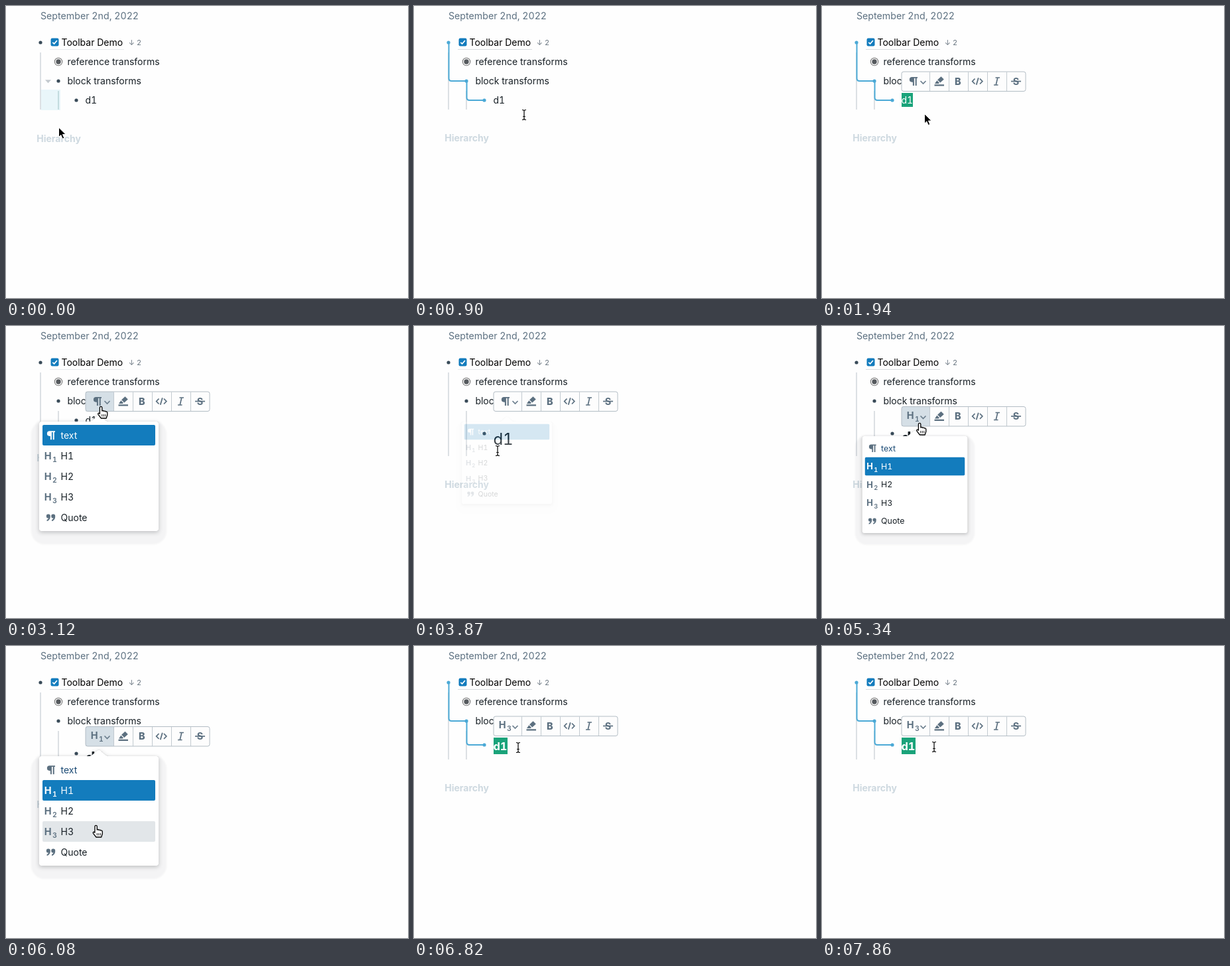
These frames come from a looping animation (606x440 px, 8000 ms). An HTML page:

```html
<!DOCTYPE html>
<html lang="en">
<head>
<meta charset="utf-8">
<title>Toolbar demo</title>
<style>
  html, body { margin: 0; width: 100%; height: 100%; overflow: hidden; background: #fefefe; }
  svg { display: block; width: 100vw; height: 100vh; }
  text { font: 14px Inter, sans-serif; font-variant-numeric: tabular-nums; white-space: pre; }
  .panel { filter: drop-shadow(0 0 .7px rgba(16,22,26,.35)) drop-shadow(0 2px 3px rgba(16,22,26,.24)); }
  .halo { filter: blur(1px); }
</style>
</head>
<body>
<svg id="stage" viewBox="0 0 606 440"></svg>
<script>
const LOOP = 8000, TICK = 148.3, LAST = 53;
const INK = '#182026', SLATE = '#5c7080', BULLET = '#394b59', LINE = '#d0d6db',
      TRAIL = '#4ba9d6', BLUE = '#137cbd', GREEN = '#1aa37a';

const between = (k, a, b) => k >= a && k <= b;
const group = (x, y, body, extra = '') => `<g transform="translate(${x} ${y})" ${extra}>${body}</g>`;
const text = (x, y, s, fill = INK, size = 14, weight = 400) =>
  `<text x="${x}" y="${y}" fill="${fill}" style="font-size:${size}px;font-weight:${weight}">${s}</text>`;
const rect = (x, y, w, h, fill, extra = '') =>
  `<rect x="${x}" y="${y}" width="${w}" height="${h}" fill="${fill}" ${extra}/>`;
const fillPath = (d, fill) => `<path d="${d}" fill="${fill}"/>`;
const stroke = (d, color, width = 1, extra = '') =>
  `<path d="${d}" fill="none" stroke="${color}" stroke-width="${width}" ${extra}/>`;
const dot = (x, y, fill, r = 2.6) => `<circle cx="${x}" cy="${y}" r="${r}" fill="${fill}"/>`;

// Icons are centred on 0,0
const pilcrow = c => fillPath('M-1.5-6.5H6.5V-4.7H5.2V6.5H3.2V-4.7H1.4V6.5H-.6V1.2H-1.8A3.85 3.85 0 0 1-1.8-6.5Z', c);
const heading = (n, c) => text(-9.7, 5, 'H', c, 14.5, 700) + text(2.6, 9, n, c, 10.5, 600);
const quote = c => [-3.7, 3.7].map(x => group(x, 0,
  fillPath('M3-2C3 2 1 4.6-2.2 5.2V3.4C-.8 2.9 0 2 .2.9A3 3 0 1 1 3-2Z', c))).join('');
const blockIcon = (type, c) => type === 'text' ? pilcrow(c) : type === 'Quote' ? quote(c) : heading(type[1], c);

// Looks of the edited block
const STYLES = {
  text: { size: 14, weight: 400, base: 146.5, bullet: 142, end: 156, foot: 203.5, sel: [131, 17, 21], bar: 98.5 },
  H1: { size: 24, weight: 700, base: 177, bullet: 162, end: 196, foot: 243.5, sel: [152, 30, 36], bar: 121 },
  H3: { size: 16.5, weight: 700, base: 156.5, bullet: 149, end: 171, foot: 218.5, sel: [138, 21, 25], bar: 105.5 }
};
const FRESH_H1 = { ...STYLES.H1, weight: 400, base: 179 };
const ITEMS = ['text', 'H1', 'H2', 'H3', 'Quote'];

// Pointer: tick, x, y, shape
const POINTER = [
  [0, 79.5, 183, 'arrow'], [3, 152, 142, 'beam'], [5, 155, 142, 'beam'], [7, 177, 186, 'arrow'],
  [12, 177, 186, 'arrow'], [13, 154.5, 162.5, 'arrow'], [15, 143, 121.5, 'hand'], [21, 143, 121.5, 'hand'],
  [24, 126, 188, 'hand'], [26, 126, 188, 'beam'], [28, 157, 172, 'beam'], [30, 172, 196, 'arrow'],
  [33, 147, 146.5, 'hand'], [37, 147, 146.5, 'hand'], [41, 135.5, 270.5, 'hand'], [43, 136, 271, 'arrow'],
  [46, 157, 153, 'beam'], [49, 180, 216, 'arrow'], [51, 171, 158, 'beam'], [53, 169, 152, 'beam']
];
const BEAM = 'M-3-7.5C-1-7.5 0-6.5 0-6V6C0 6.5-1 7.5-3 7.5M3-7.5C1-7.5 0-6.5 0-6V6C0 6.5 1 7.5 3 7.5M-1.8 2.5H1.8';
const SHAPES = {
  arrow: '<path d="M0 0V14.5L3.3 11.4 5.7 17 8.3 15.9 5.9 10.5H10.6Z" stroke="#fff" stroke-width="1"/>',
  beam: stroke(BEAM, '#fff', 2.6) + stroke(BEAM, '#000', 1.2),
  hand: '<path d="M-1.6 10V1.5A1.7 1.7 0 0 1 1.8 1.5V6.5Q3.6 5.4 4.6 7Q6.4 6 7.4 7.6Q9.6 7 9.8 9.3V12.5L8.2 17.5H.4L-4 11.8Q-4.8 10-3.2 9.6Q-2.4 9.6-1.6 10.8Z" fill="#fff" stroke="#000" stroke-width="1.3" stroke-linejoin="round"/>'
    + stroke('M1.8 11.5v3.5M4.3 11.5v3.5M6.8 11.5v3.5', '#000', .9)
};

function pointerAt(k) {
  const i = POINTER.findLastIndex(p => p[0] <= k);
  const [t, x, y, shape] = POINTER[i], [t2, x2, y2] = POINTER[i + 1] || [t + 1, x, y];
  const u = (k - t) / (t2 - t);
  return { x: x + (x2 - x) * u, y: y + (y2 - y) * u, shape };
}

function outline(k, style, focus, selected) {
  const c = focus ? TRAIL : BULLET, b = style.bullet;
  let s = text(52, 19.5, 'September 2nd, 2022', SLATE, 14.2);
  if (k < 1) s += rect(53, 126, 29, 31, '#e9f6fa') + fillPath('M59 111.3H68L63.5 116.3Z', '#c3c9ce');
  s += stroke(`M52 70V${style.end}`, LINE, 1.5) + stroke(`M79 128V${style.end}`, k < 1 ? '#b5d3d6' : LINE, 1.5);
  if (focus) s += stroke(`M52.5 55V109Q52.5 113 56.5 113H79.5V${b - 4}Q79.5 ${b} 83.5 ${b}H106`, TRAIL, 2);
  s += dot(52, 55, c) + dot(79, 113, c) + dot(106, b, c);
  s += rect(67.5, 48.5, 12, 12, BLUE, 'rx="2.3"') + stroke('M70.3 54.8L72.6 57.1 76.9 52', '#fff', 1.7);
  s += text(83.5, 59.5, 'Toolbar Demo', '#000') + text(184.8, 59, '↓ 2', '#66737e', 11);
  s += stroke('M66 65.5H178', focus || k >= 28 ? '#d9dde0' : '#e8ebed');
  s += `<circle cx="79" cy="84" r="5.7" fill="#fff" stroke="#777" stroke-width="1.1"/>` + dot(79, 84, '#55595d', 3.7);
  s += text(92.4, 88.5, 'reference transforms') + text(92.4, 117.5, 'block transforms');
  if (selected) s += rect(120, style.sel[0], style.sel[1], style.sel[2], GREEN);
  s += text(119.4, style.base, 'd1', selected ? '#fff' : INK, style.size, style.weight);
  return s + text(46.2, k < 6 ? 204.5 : style.foot, 'Hierarchy', '#ced9e0', 14, 700);
}

function toolbar(type, top, active, opacity) {
  const c = SLATE;
  const s = rect(120, .5, 187, 29.5, '#fdfdfd', 'rx="3"')
    + (active ? rect(120, .5, 42, 29.5, '#d5dfe6') : '')
    + stroke('M162.5 1V30M191.5 1V30M220.5 1V30M249.5 1V30M278.5 1V30', '#c2cad0')
    + rect(120, .5, 187, 29.5, 'none', 'rx="3" stroke="#b3bdc5"')
    + group(137.5, type === 'text' ? 15 : 13.5, blockIcon(type, c))
    + stroke('M148.5 14.5L152.5 18.5 156.5 14.5', '#6b7e8d', 1.7)
    + group(176.5, 15, fillPath('M-7 4.8H7.5V7H-7ZM-6.5 3.4L-3.2-1.2.6 2.5-1 3.4ZM-2.4-2.2L3-7.2 7.3-3 1.8 2Z', c))
    + text(200, 20.2, 'B', c, 14.5, 800)
    + stroke('M230.5 11L226.7 15 230.5 19M238 11L241.8 15 238 19M235.8 9.8L232.7 20.2', c, 1.8)
    + stroke('M261.5 9.5H268M259 20.5H265.5M264.8 9.5L262.2 20.5', c, 1.7)
    + text(287.7, 20.2, 'S', c, 14.5, 700) + stroke('M285 15H300', c, 1.7);
  return group(0, top, s, `opacity="${opacity}"`);
}

function menu(current, top, scale, opacity, hover, focused) {
  let s = rect(38, -1, 204, 186, 'rgba(16,22,26,.04)', 'rx="20" class="halo"')
    + `<g class="panel"><path d="M53 0H126C132-1 136-9.5 140-9.5S148-1 154 0H227Q230 0 230 3V162Q230 165 227 165H53Q50 165 50 162V3Q50 0 53 0Z" fill="#fff"/></g>`;
  ITEMS.forEach((name, i) => {
    const on = name === current, y = 5 + 31 * i;
    if (on || i === hover) s += rect(55, y, 170, 31, on ? BLUE : '#e2e6e9', 'rx="2"');
    s += group(67.5, y + 15.7, blockIcon(name, on ? '#fff' : SLATE));
    s += text(82.5, y + 20.5, name, on ? '#fff' : focused && !i ? '#1c4b75' : INK);
  });
  return `<g opacity="${opacity}" transform="translate(140 ${top}) scale(${scale}) translate(-140 0)">${s}</g>`;
}

function scene(k) {
  const type = k < 26 ? 'text' : k < 43 ? 'H1' : 'H3';
  const style = k === 26 ? FRESH_H1 : STYLES[type];
  const focus = between(k, 6, 17) || between(k, 28, 33) || k >= 45;
  const selected = between(k, 9, 17) || between(k, 30, 33) || k >= 46;
  const active = between(k, 18, 25) || between(k, 34, 42);
  const p = pointerAt(k);
  let s = outline(k, style, focus, selected);

  // The bar keeps its old place and icon while the menu closes
  const barType = k <= 26 ? 'text' : k <= 43 ? 'H1' : 'H3';
  if (between(k, 9, 26) || between(k, 30, 43) || k >= 46)
    s += toolbar(barType, STYLES[barType].bar, active, k === 9 ? .5 : 1);

  const first = k <= 26, start = first ? 18 : 34, close = first ? 26 : 43;
  if (k > start && k <= close) {
    const n = k - start, top = first ? 144 : 166, closing = k === close;
    const scale = closing ? .755 : [0, .55, .885][n] || 1;
    const opacity = closing ? .17 : n === 1 ? .6 : 1;
    const hover = closing ? -1 : Math.floor((p.y - top - 5) / 31);
    s += menu(first ? 'text' : 'H1', top, scale, opacity, hover, !first && n > 1);
  }
  return s + group(p.x, p.y, SHAPES[p.shape]);
}

const stage = document.getElementById('stage');
let shown = -1;
function draw(now) {
  const k = Math.min(LAST, Math.floor((now % LOOP + 5) / TICK));
  if (k !== shown) stage.innerHTML = scene(shown = k);
}
const begin = performance.now();
function loop() {
  draw(performance.now() - begin);
  requestAnimationFrame(loop);
}
loop();
</script>
</body>
</html>
```
